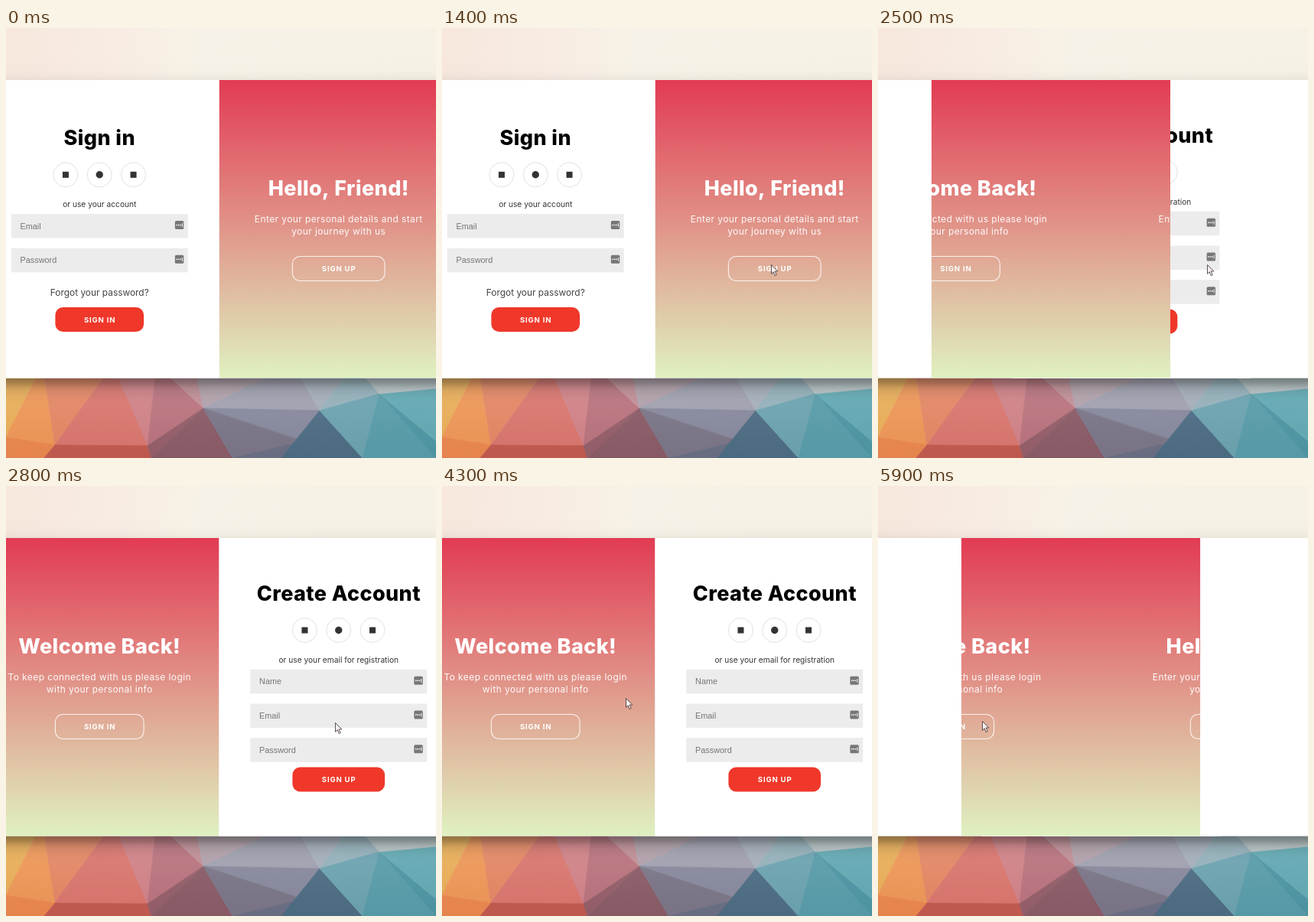
An HTML page with a canvas that plays this animation: 562x562 px, repeating every 6 s.

```html
<!DOCTYPE html>
<html lang="en">
<head>
<meta charset="utf-8">
<title>Sliding sign-in form</title>
<style>
  html, body { margin: 0; width: 100%; height: 100%; overflow: hidden; background: #f6f1e5; }
  canvas { display: block; width: 562px; height: 562px; }
</style>
</head>
<body>
<canvas id="stage"></canvas>
<script>
const SIZE = 562, LOOP = 6000, STEP = 100;
const TOP = 68, BOTTOM = 457.5, HALF = 312.5, LEFT = -34;
const MID = LEFT + HALF / 2;
const SLIDE = 600, TO_SIGNUP = 2140, TO_SIGNIN = 5615;
const CLICKS = [
  { down: 2055, up: TO_SIGNUP, x: 430, y: 309 },
  { down: 5530, up: TO_SIGNIN, x: 137, y: 309 }
];
const RED = '#ef382a';
const SANS = 'Inter, "Open Sans", sans-serif';
const ARIAL = '"Liberation Sans", Arial, sans-serif';

const canvas = document.getElementById('stage');
const ctx = canvas.getContext('2d');
const dpr = window.devicePixelRatio || 1;
canvas.width = canvas.height = SIZE * dpr;

const clamp = v => Math.max(0, Math.min(1, v));

// CSS cubic-bezier with end points (0,0) and (1,1)
function bezier(x1, y1, x2, y2) {
  const at = (a, b, s) => 3 * (1 - s) * (1 - s) * s * a + 3 * (1 - s) * s * s * b + s * s * s;
  return x => {
    if (x <= 0 || x >= 1) return clamp(x);
    let lo = 0, hi = 1;
    for (let i = 0; i < 24; i++) {
      const s = (lo + hi) / 2;
      if (at(x1, x2, s) < x) lo = s; else hi = s;
    }
    return at(y1, y2, lo);
  };
}
const easeInOut = bezier(.42, 0, .58, 1);
const easeIn = bezier(.42, 0, 1, 1);

function text(str, x, y, font, color, spacing = 0, align = 'center') {
  ctx.font = font;
  ctx.fillStyle = color;
  ctx.letterSpacing = spacing + 'px';
  ctx.textAlign = align;
  ctx.fillText(str, x, y);
}

function roundRect(x, y, w, h, r) {
  ctx.beginPath();
  ctx.roundRect(x, y, w, h, r);
}

function title(str, x, y, color) {
  text(str, x, y, '800 27px ' + SANS, color, .4);
}

// Low-poly wallpaper: corners by letter, facets as letter groups
const corners = {
  a: [0, 440], b: [48, 440], c: [0, 535], d: [64, 545], e: [0, 562], f: [140, 440],
  g: [185, 546], h: [197, 440], i: [258, 497], j: [246, 440], k: [375, 440], l: [410, 500],
  m: [488, 478], n: [562, 471], o: [455, 440], p: [296, 562], q: [360, 562], r: [466, 562],
  s: [562, 540], t: [562, 562], u: [190, 562], v: [562, 440], w: [388, 540], x: [50, 562]
};
const facets = [
  'abc #eeb259', 'bcd #f49a58', 'cdxe #f08a4f', 'bdf #e98a66', 'dfg #de7870',
  'fgh #d5858a', 'hgi #bd7580', 'hij #c4929a', 'dgux #c65c50', 'giu #97606b',
  'iup #8c5d69', 'jik #b4a4ae', 'ikl #a3a4b4', 'ilw #898ca0', 'iwp #7c788a',
  'wpq #6b7187', 'kol #a7b2be', 'olm #97b5bf', 'lqr #4c6f86', 'lmr #6ca7b4',
  'mrt #58a0ad', 'mts #4d99a7', 'mns #63adb7', 'omnv #b9c8ca'
];

function wallpaper() {
  const sky = ctx.createLinearGradient(0, 0, SIZE, 50);
  sky.addColorStop(0, '#f7e7dd');
  sky.addColorStop(.25, '#f8ece3');
  sky.addColorStop(.45, '#f7f2e7');
  sky.addColorStop(1, '#f6f1e5');
  ctx.fillStyle = sky;
  ctx.fillRect(0, 0, SIZE, SIZE);
  ctx.lineWidth = .8;
  for (const facet of facets) {
    const [keys, color] = facet.split(' ');
    ctx.beginPath();
    for (const k of keys) ctx.lineTo(...corners[k]);
    ctx.closePath();
    ctx.fillStyle = ctx.strokeStyle = color;
    ctx.fill();
    ctx.stroke();
  }
  const light = ctx.createLinearGradient(0, BOTTOM, 0, SIZE);
  light.addColorStop(0, 'rgba(255,255,255,.1)');
  light.addColorStop(1, 'rgba(60,30,40,.06)');
  ctx.fillStyle = light;
  ctx.fillRect(0, BOTTOM, SIZE, SIZE - BOTTOM);
}

function card() {
  ctx.save();
  ctx.fillStyle = '#fff';
  for (const [dy, blur, alpha] of [[11, 23, .25], [8, 8, .22]]) {
    ctx.shadowColor = `rgba(0,0,0,${alpha})`;
    ctx.shadowOffsetY = dy * dpr;
    ctx.shadowBlur = blur * dpr;
    ctx.fillRect(LEFT, TOP, HALF * 2, BOTTOM - TOP);
  }
  ctx.restore();
}

function social(x, y) {
  for (const side of [-1, 0, 1]) {
    const cx = x + side * 44.3;
    ctx.beginPath();
    ctx.arc(cx, y, 16, 0, Math.PI * 2);
    ctx.strokeStyle = '#dedede';
    ctx.lineWidth = .9;
    ctx.stroke();
    ctx.fillStyle = '#333';
    ctx.beginPath();
    if (side) ctx.rect(cx - 4, y - 4, 8, 8);
    else ctx.arc(cx, y, 4.7, 0, Math.PI * 2);
    ctx.fill();
  }
}

function field(label, x, y) {
  ctx.fillStyle = '#ececec';
  ctx.fillRect(x - 115.4, y, 230.8, 31.5);
  text(label, x - 103.7, y + 19.6, '10.85px ' + ARIAL, '#757575', 0, 'left');
  ctx.fillStyle = '#777';
  roundRect(x + 98.6, y + 9, 11.4, 11, 1.5);
  ctx.fill();
  ctx.fillStyle = '#fff';
  for (let i = 0; i < 3; i++) ctx.fillRect(x + 100.3 + i * 2.4, y + 13.8, 1.5, 1.5);
  ctx.fillRect(x + 107.7, y + 12.2, .9, 4.8);
}

function button(label, x, y, w, { ghost = false, scale = 1 } = {}) {
  ctx.save();
  ctx.translate(x, y);
  ctx.scale(scale, scale);
  roundRect(-w / 2 + .4, -16, w - .8, 32, 10);
  if (ghost) {
    ctx.strokeStyle = 'rgba(255,255,255,.85)';
    ctx.lineWidth = 1.1;
    ctx.stroke();
  } else {
    ctx.fillStyle = RED;
    ctx.fill();
  }
  text(label, .4, 3.6, '700 9.6px ' + SANS, '#fff', .8);
  ctx.restore();
}

function formBase(x) {
  ctx.fillStyle = '#fff';
  ctx.fillRect(x - HALF / 2, TOP, HALF, BOTTOM - TOP);
}

function signIn(x) {
  formBase(x);
  title('Sign in', x, 153, '#000');
  social(x, 191.8);
  text('or use your account', x, 234.2, '10.2px ' + SANS, '#333');
  field('Email', x, 243);
  field('Password', x, 287.8);
  text('Forgot your password?', x, 349.5, '11.9px ' + SANS, '#444');
  button('SIGN IN', x, 381, 116.5);
}

function signUp(x) {
  formBase(x);
  title('Create Account', x, 149.5, '#000');
  social(x, 188.5);
  text('or use your email for registration', x, 231, '10.2px ' + SANS, '#333');
  field('Name', x, 239.8);
  field('Email', x, 284.5);
  field('Password', x, 329.2);
  button('SIGN UP', x, 383.5, 121.5);
}

function message(x, heading, lines, label, w, scale) {
  title(heading, x, 218.7, '#fff');
  lines.forEach((line, i) =>
    text(line, x, 254 + i * 16.3, '12px ' + SANS, 'rgba(255,255,255,.94)', .4));
  button(label, x, 314.5, w, { ghost: true, scale });
}

// Button press: shrinks over 80 ms, springs back on release
function pressScale(click, t) {
  const pressed = easeIn(clamp((t - click.down) / 80));
  const released = easeIn(clamp((t - click.up) / 80));
  return 1 - .05 * pressed * (1 - released);
}

function overlay(p, t) {
  const x = LEFT + HALF * (1 - p);
  ctx.save();
  ctx.beginPath();
  ctx.rect(x, TOP, HALF, BOTTOM - TOP);
  ctx.clip();
  const fill = ctx.createLinearGradient(0, TOP, 0, BOTTOM);
  fill.addColorStop(0, '#e23b53');
  fill.addColorStop(1, '#dff1c1');
  ctx.fillStyle = fill;
  ctx.fillRect(x, TOP, HALF, BOTTOM - TOP);
  const drift = HALF * .2;
  message(MID - drift * (1 - p), 'Welcome Back!',
    ['To keep connected with us please login', 'with your personal info'],
    'SIGN IN', 116.5, pressScale(CLICKS[1], t));
  message(MID + HALF + drift * p, 'Hello, Friend!',
    ['Enter your personal details and start', 'your journey with us'],
    'SIGN UP', 121.5, pressScale(CLICKS[0], t));
  ctx.restore();
}

// Pointer stops: time, x, y
const path = [
  [700, 452, 570], [1400, 430, 309], [3200, 430, 309], [3900, 262, 262],
  [4200, 262, 262], [4300, 240, 277], [4600, 160, 306], [4900, 160, 306],
  [5100, 142, 309], [5300, 136, 307]
];

function pointerAt(t) {
  const next = path.findIndex(stop => stop[0] > t);
  if (next < 0) return path[path.length - 1].slice(1);
  if (next === 0) return path[0].slice(1);
  const [t0, x0, y0] = path[next - 1], [t1, x1, y1] = path[next];
  const k = easeInOut((t - t0) / (t1 - t0));
  return [x0 + (x1 - x0) * k, y0 + (y1 - y0) * k];
}

function pointer(t) {
  const [x, y] = pointerAt(t);
  ctx.save();
  ctx.translate(x, y);
  ctx.beginPath();
  for (const [dx, dy] of [[.5, .5], [.5, 12.3], [3.2, 9.8], [5.2, 14.6], [7.2, 13.7], [5.2, 9], [8.8, 9]])
    ctx.lineTo(dx, dy);
  ctx.closePath();
  ctx.fillStyle = '#f7efec';
  ctx.strokeStyle = '#4a4245';
  ctx.lineWidth = .9;
  ctx.fill();
  ctx.stroke();
  ctx.restore();
}

function clickRing(click, t) {
  const age = t - click.down;
  if (age < 0 || age > 200) return;
  ctx.globalAlpha = 1 - clamp((age - 80) / 120);
  ctx.beginPath();
  ctx.arc(click.x, click.y, Math.min(12 + age * .195, 30), 0, Math.PI * 2);
  ctx.strokeStyle = '#de3d4f';
  ctx.lineWidth = 3.4;
  ctx.stroke();
  ctx.globalAlpha = 1;
}

function draw(t) {
  ctx.setTransform(dpr, 0, 0, dpr, 0, 0);
  wallpaper();
  card();

  const there = clamp((t - TO_SIGNUP) / SLIDE);
  const back = easeInOut(clamp((t - TO_SIGNIN) / SLIDE));
  const p = easeInOut(there) - back;
  const x = MID + HALF * p;
  signIn(x);
  // The second form takes over halfway and fades on the way back
  if (there >= .5 && back < .75) {
    ctx.globalAlpha = 1 - back;
    signUp(x);
    ctx.globalAlpha = 1;
  }
  overlay(p, t);
  CLICKS.forEach(click => clickRing(click, t));
  pointer(t);
}

const start = performance.now();
function tick() {
  const t = (performance.now() - start) % LOOP;
  draw(Math.floor(t / STEP) * STEP);
  requestAnimationFrame(tick);
}
tick();
</script>
</body>
</html>
```
